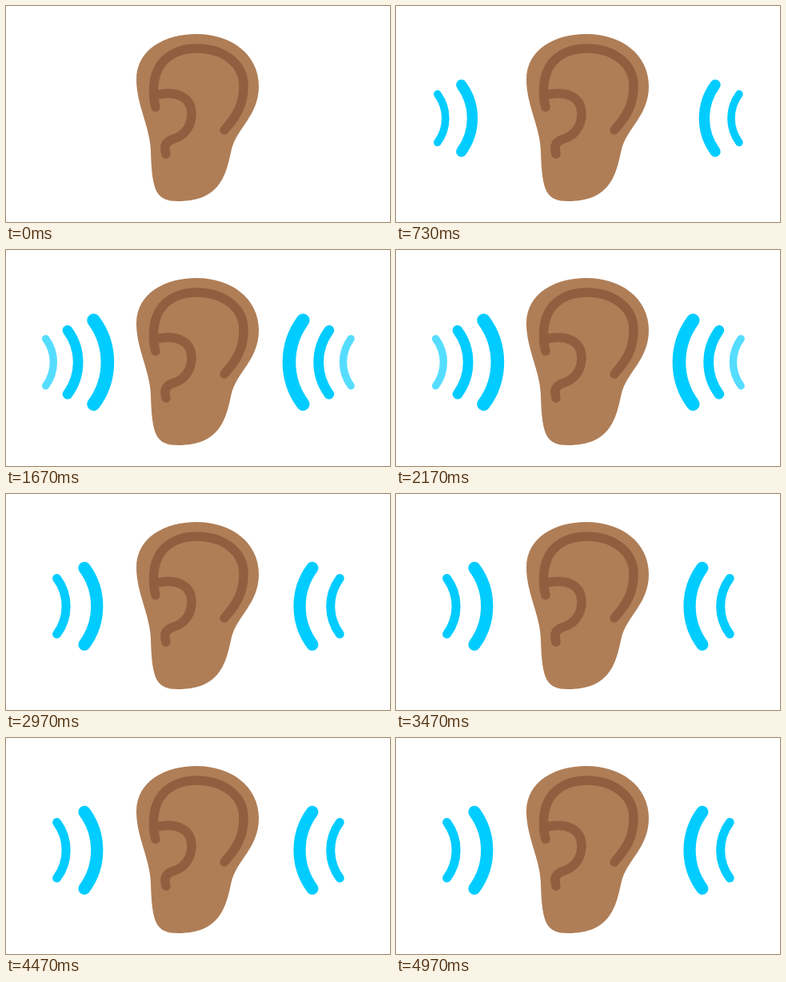
Animation of 480 by 270 pixels, one loop 5.01 s. Source, as an HTML page:

```html
<!DOCTYPE html>
<html lang="en">
<head>
<meta charset="utf-8">
<title>Listening ear</title>
<style>
  html, body { margin: 0; width: 100%; height: 100%; overflow: hidden; background: #fff; }
  svg { display: block; width: 100vw; height: 100vh; }
  .fold { fill: none; stroke: #915f3f; stroke-width: 11.5; stroke-linecap: round; stroke-linejoin: round; }
  .wave { fill: none; stroke: #0cf; stroke-width: .318; stroke-linecap: round; }
</style>
</head>
<body>
<svg viewBox="0 0 480 270">
  <g id="left"></g>
  <use href="#left" transform="translate(480.8 0) scale(-1 1)"/>
  <path fill="#af7e57" d="M238 35C282 35 316 61 316 100C316 138 288 152 281.5 181C275 211 268 244 215 244C188 244 182.5 232 181 183C181 153 163 124 163 92C163 54 199 35 238 35Z"/>
  <path class="fold" d="M187 126.5C183 112 184 95 188 84C195 63 216 53 238 53C272 53 297 72 297 100C297 125 287 139 273 155"/>
  <path class="fold" d="M187 111.5C212 105 232 113 232 135C232 150 223 162 210 166C200 169 197 175 200 185"/>
</svg>
<script>
  const LOOP = 5010, STEP = 100 / 3, STEPS = 150;
  const LIFE = 45, GAP = 15, FADE = 6;
  const left = document.getElementById('left');

  const waves = [0, 1, 2].map(() => {
    const arc = document.createElementNS('http://www.w3.org/2000/svg', 'path');
    arc.setAttribute('class', 'wave');
    arc.setAttribute('d', 'M0-1A1.68 1.68 0 0 1 0 1');
    return left.appendChild(arc);
  });

  const clamp = v => Math.max(0, Math.min(1, v));
  const ease = t => t * t * (3 - 2 * t);

  function draw(now) {
    const time = now % LOOP;
    const step = Math.min(STEPS - 1, Math.floor((time + 3.5) / STEP));
    waves.forEach((arc, i) => {
      const since = step - i * GAP;
      const age = since < 0 ? 0 : since % LIFE;
      const e = ease(age / LIFE);
      const x = 47.2 + 71.4 * e, size = 28.5 + 27.3 * e;
      const alpha = clamp((age - 1) / FADE) * clamp((LIFE - 1 - age) / FADE);
      arc.setAttribute('transform', `translate(${x} 140.3) scale(${size})`);
      arc.setAttribute('opacity', alpha);
    });
  }

  const start = performance.now();
  function tick() {
    draw(performance.now() - start);
    requestAnimationFrame(tick);
  }
  tick();
</script>
</body>
</html>
```
